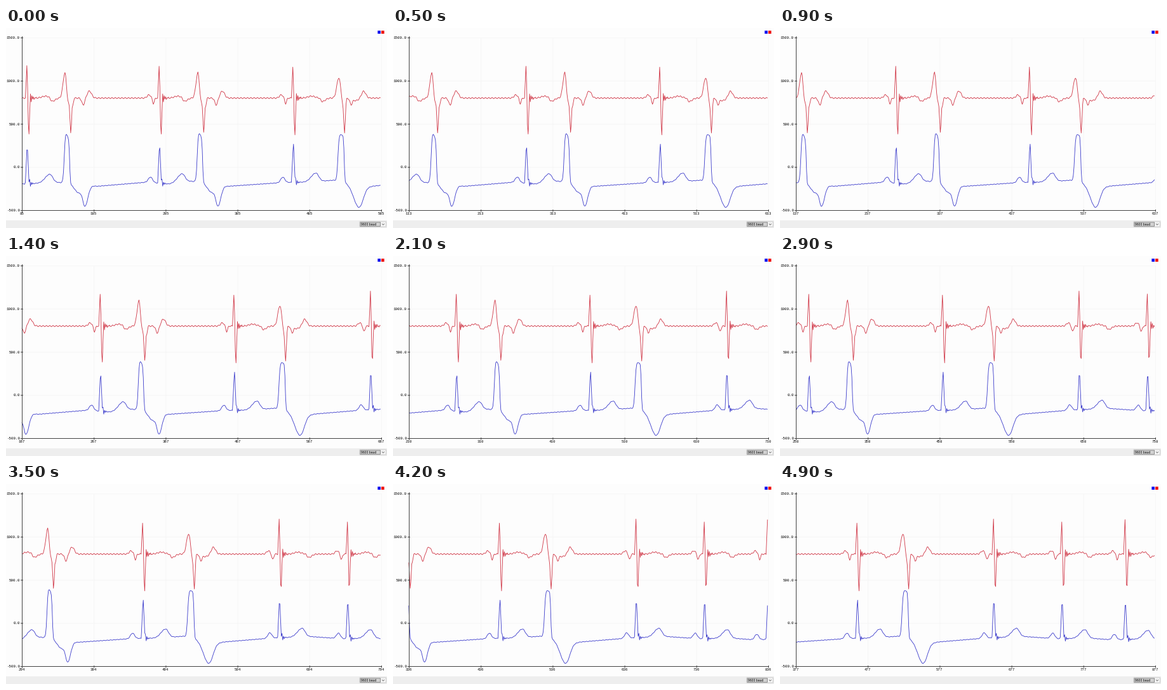
Animation of 600 by 314 pixels, one loop 5000 ms. Source, as a matplotlib script:

```python
import numpy as np
import matplotlib.pyplot as plt
from matplotlib.animation import FuncAnimation
from matplotlib.patches import Rectangle

W, H, DPI = 600, 314, 100
PX = 72 / DPI
LEFT, RIGHT, TOP, BOTTOM = 25.5, 591.5, 15.5, 286.5
SPAN, FIRST, LAST = 500, 85, 880
STEP = (RIGHT - LEFT) / SPAN
FRAMES, INTERVAL = 50, 100
RED_BASE = 110
INK = "#444444"

# sample, red peak height, red trough offset, blue spike offset, P offset, T dip offset
NARROW_BEATS = [
    (92, 51, 2.75, 0.5, -14, 35),
    (276, 50, 2.75, 0.6, -12, 35),
    (462, 49, 2.75, 0.75, -14, 41),
    (652, 54, 2.55, 0.5, -13, 41),
    (747, 51, 2.45, 0.5, -12.5, 38),
    (835, 54, 2.5, 0.5, -15, 35),
]

# slow drift of the blue baseline: (sample, y)
DRIFT = [(85, 245), (135, 242.5), (190, 248.5), (260, 242), (290, 245),
         (320, 240.5), (372, 248.5), (450, 242.5), (485, 242), (518, 239),
         (570, 248.5), (640, 242), (695, 239.5), (740, 243), (785, 242),
         (815, 244.5), (880, 243)]


def bump(d, center, height, left, right=None):
    width = np.where(d < center, left, right or left)
    return height * np.exp(-0.5 * ((d - center) / width) ** 2)


def spike(d, center, height, half_width):
    return height * np.maximum(0, 1 - np.abs(d - center) / half_width)


def ringing(d, begin, height, decay):
    t = np.maximum(d - begin, 0)
    return np.where(d >= begin, height * np.exp(-t / decay) * np.cos(np.pi * t), 0)


def pulse(d, rise, fall):
    return 1 / (1 + np.exp(np.clip((rise - d) / 0.8, -50, 50))) \
        / (1 + np.exp(np.clip((d - fall) / 0.5, -50, 50)))


def narrow_beat(d, peak, trough, tip, p, t_dip):
    red = (spike(d, 0, -peak, 2) + spike(d, trough, 66, 1.9) + ringing(d, 5, -7, 3)
           + bump(d, p - 2, -5, 2.5) + bump(d, p + 4, 9, 1.3)
           + bump(d, 26, -3, 5) + bump(d, t_dip, 5.5, 2, 4))
    blue = (spike(d, tip, -66, 2.6) + ringing(d, 4, -6.5, 2)
            + bump(d, p, -8.5, 2.8) + bump(d, 32, -13.5, 6.5, 4))
    return red, blue


def broad_beat(d):
    red = (bump(d, 0, -40, 2.6, 1.8) + bump(d, 5, 8, 1.3) + bump(d, 8.2, 54, 1.1)
           + bump(d, 11.2, 10, 0.7) + bump(d, 25.5, 11, 2) + bump(d, 34, -11, 3))
    blue = ((2.5 * d - 84) * pulse(d, -0.9, 6.6)
            + bump(d, 19, 13, 5.5, 5) + bump(d, 28, 31, 3, 4))
    return red, blue


def late_broad_beat(d):
    red = (bump(d, 0, -32, 2.8, 2.3) + bump(d, 5.5, 9, 1.3) + bump(d, 8, 53, 1.1)
           + bump(d, 17, 9, 1.5) + bump(d, 23, 4, 5) + bump(d, 34.5, -11, 3))
    blue = -74 * pulse(d, -1.3, 7.5) + bump(d, 28, 36, 7.5, 6)
    return red, blue


def build_traces():
    n = np.arange(FIRST, LAST)
    beats = [narrow_beat(n - at, *shape) for at, *shape in NARROW_BEATS]
    beats += [broad_beat(n - 145), broad_beat(n - 330), late_broad_beat(n - 526)]
    red, blue = np.sum(beats, axis=0)
    ripple = np.sin(2 * np.pi * n / 4.6)
    return red + RED_BASE + ripple, blue + np.interp(n, *zip(*DRIFT)) + 0.4 * ripple


def start_at(frame):
    return round(np.interp(frame, [0, 5, 35, 49], [85, 113, 294, 377]))


red, blue = build_traces()

fig = plt.figure(figsize=(W / DPI, H / DPI), dpi=DPI, facecolor="white")
ax = fig.add_axes([0, 0, 1, 1])
ax.set_xlim(0, W)
ax.set_ylim(H, 0)
ax.axis("off")


def box(x, y, w, h, fill, edge="none"):
    ax.add_patch(Rectangle((x, y), w, h, fc=fill, ec=edge, lw=0.8 * PX, snap=False))


def line(xs, ys, color, width=1.0):
    return ax.plot(xs, ys, color=color, lw=width * PX, snap=False,
                   solid_capstyle="butt", solid_joinstyle="round")[0]


def label(x, y, text, ha, size=5.8, font="Liberation Mono"):
    return ax.text(x, y, text, ha=ha, va="center_baseline", fontsize=size * PX,
                   family=font, color="black")


box(0, 0, W, 302, "#fdfdfd")
box(0, 302, W, 12, "#eeeeee")

x_ticks = np.linspace(LEFT, RIGHT, 6)
y_ticks = np.linspace(TOP, BOTTOM, 5)
for x in x_ticks[1:]:
    line([x, x], [TOP, BOTTOM], "#f6f6f6")
for y in y_ticks[:-1]:
    line([LEFT, RIGHT], [y, y], "#f6f6f6")

traces = [(line([], [], "#3a3acb", 0.85), blue), (line([], [], "#d03545", 0.85), red)]

line([LEFT, LEFT], [13, 289], INK)
line([23, RIGHT], [BOTTOM, BOTTOM], INK)
for y, value in zip(y_ticks, range(1500, -501, -500)):
    line([23, 27], [y, y], INK)
    label(21.8, y - 0.3, f"{value:.1f}", "right")
x_labels = []
for x in x_ticks:
    line([x, x], [285, 288.5], INK)
    x_labels.append(label(x - 0.5, 291, "", "center"))

box(585.3, 4.2, 4.7, 4.8, "#1010f0")
box(591, 4.2, 4.7, 4.8, "#f01010")

box(557, 304, 41.5, 8, "#f4f4f4", "#c4c4c4")
box(558, 305, 31.5, 6.3, "#d2d2d2", "#777777")
label(558.8, 308.2, "9600 baud", "left", 5, "Liberation Sans")
line([592, 594, 596], [307.3, 309.1, 307.3], "#666666", 0.8)


def draw(frame):
    start = start_at(frame)
    xs = LEFT - 0.6 + STEP * np.arange(SPAN)
    first = start - FIRST
    for trace, values in traces:
        trace.set_data(xs, values[first:first + SPAN])
    for i, text in enumerate(x_labels):
        text.set_text(str(start + 100 * i))
    return [trace for trace, _ in traces] + x_labels


animation = FuncAnimation(fig, draw, frames=FRAMES, interval=INTERVAL,
                          repeat=True, repeat_delay=0, blit=False)
plt.show()
```
